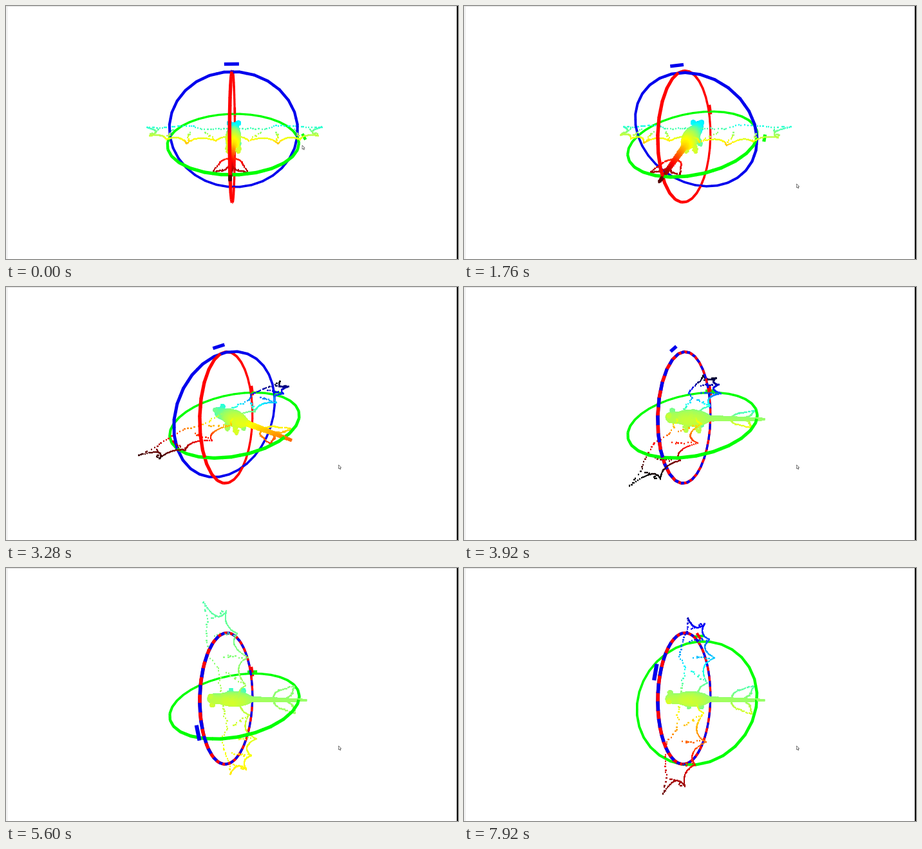
These frames come from a looping animation (702x394 px, 8000 ms). A matplotlib script:

```python
import numpy as np
import matplotlib.pyplot as plt
from matplotlib.animation import FuncAnimation
from matplotlib.collections import LineCollection
from matplotlib.patches import Polygon

W, H, STEP, FRAMES = 702, 394, 80, 100
CENTER = np.array([352.5, 203.5])
FOCAL, DISTANCE, ELEVATION = 349.5, 3.53, 26.7
RED, GREEN, BLUE = np.eye(3) * [1.0, 1.0, 0.93]
rng = np.random.default_rng(4)


def rot(axis, degrees):
    c, s = np.cos(np.radians(degrees)), np.sin(np.radians(degrees))
    i, j = [(1, 2), (2, 0), (0, 1)]["xyz".index(axis)]
    m = np.eye(3)
    m[i, i] = m[j, j] = c
    m[i, j], m[j, i] = -s, s
    return m


def key(t, *pairs):
    return np.interp(t, *zip(*pairs))


def jet(v):
    """Rainbow that fades to black beyond both ends."""
    return np.clip(1.5 - np.abs(4 * v[:, None] - [3, 2, 1]), 0, 1)


# ---- creature: x = wing span, y = up, z = towards the tail
def along(points, count):
    points = np.array(points, float)
    t = np.linspace(0, len(points) - 1, count)
    return np.column_stack([np.interp(t, np.arange(len(points)), col)
                            for col in points.T])


def tube(z, flat=True):
    radius = np.interp(z, [-.43, -.38, -.28, -.2, -.1, .05, .2, .3, .65, 1.09],
                       [.03, .075, .085, .085, .115, .125, .09, .035, .025, .008])
    angle = 2.39996 * np.arange(len(z))
    return np.column_stack([.85 * radius * np.cos(angle),
                            1.05 * radius * np.sin(angle), z])


def blob(x, y, z, rx, ry, count=35):
    d = rng.normal(size=(count, 3))
    d /= np.linalg.norm(d, axis=1)[:, None]
    return [x, y, z] + d * [rx, ry, rx]


def arc(start, mid, end, count=24):
    start, mid, end = map(np.array, (start, mid, end))
    ctrl = 2 * mid - (start + end) / 2
    t = np.linspace(0, 1, count)[:, None]
    return (1 - t) ** 2 * start + 2 * t * (1 - t) * ctrl + t ** 2 * end


def wing():
    tips = [(1.438, -.215), (1.28, .1), (.98, .22), (.65, .34), (.24, .26)]
    mids = [(1.24, -.06), (1.11, .09), (.82, .165), (.49, .18)]
    front = [(1.438, -.215), (1.2, -.2), (.985, -.258), (.715, -.287),
             (.51, -.137), (.25, -.15), (.08, -.15)]
    parts = [arc(p, m, q) for p, m, q in zip(tips, mids, tips[1:])]
    parts.append(along([(.24, .26), (.18, .17), (.08, .12)], 12))
    parts.append(along(front, 34) + rng.normal(0, .008, (34, 2)))
    for root, tip in zip(front[1:5], tips[1:]):
        t = rng.uniform(.25, .9, 9)[:, None]
        parts.append(root + t * (np.array(tip) - root)
                     + rng.normal(0, .012, (9, 2)))
    flat = np.vstack(parts)
    return np.column_stack([flat[:, 0], np.full(len(flat), .065), flat[:, 1]])


def hind_leg():
    flat = along([(.02, .64), (.07, .65), (.13, .71), (.16, .8), (.215, .94),
                  (.13, .92), (.07, .9), (.03, .84)], 44)
    flat += rng.normal(0, .004, flat.shape)
    return np.column_stack([flat[:, 0], np.zeros(44), flat[:, 1]])


def both_sides(p):
    return np.vstack([p, p * [-1, 1, 1]])


body = [tube(np.linspace(-.43, .3, 1100)), tube(np.linspace(.28, 1.09, 420))]
for z in (-.1, .11):
    body.append(both_sides(blob(.075, -.15, z, .035, .07)))
body.append(both_sides(blob(.07, .09, -.34, .03, .03)))
body = np.vstack(body)
limbs = both_sides(np.vstack([wing(), hind_leg()]))
cloud = np.vstack([body, limbs])
dot_size = np.r_[np.full(len(body), 3.0), np.full(len(limbs), 2.4)]

# ---- gimbal rings: 30-sided, each side cut in two
corner = np.radians(np.arange(31) * 12)
circle = np.column_stack([np.cos(corner), np.sin(corner)])
circle = along(circle, 61)
zero = np.zeros(61)
RINGS = {
    "red": (np.column_stack([zero, circle]), [0, 0, -1.1], [0, .1, 0], RED),
    "green": (np.column_stack([circle[:, 0], zero, circle[:, 1]]),
              [1.1, 0, 0], [0, 0, .1], GREEN),
    "blue": (np.column_stack([circle, zero]), [0, 1.1, 0], [.1, 0, 0], BLUE),
}


def ring_pieces(name):
    pts, tick, half, color = RINGS[name]
    start, end = pts[:-1], pts[1:]
    pad = .04 * (end - start)
    tick, half = np.array(tick), np.array(half)
    return (np.vstack([start - pad, tick - half]),
            np.vstack([end + pad, tick + half]), color)


PIECES = {name: ring_pieces(name) for name in RINGS}


def angles(t):
    turn = 1640
    pitch = key(t, (7100, 0), (7100 + turn, 90))
    yaw = key(t, (1800, 0), (2240, 4), (3800, 90))
    roll = key(t, (3815, 0), (3815 + turn, 90), (3815 + 2 * turn, 0))
    return pitch, yaw, roll


def camera(t):
    orbit = key(t, (0, 2.2), (80, 2.8), (240, 2.8), (1680, 22.7))
    lift = key(t, (240, 0), (1680, 2.5))
    return rot("x", lift) @ rot("y", -orbit) @ rot("x", ELEVATION)


def project(points, cam):
    p = points @ cam.T
    depth = DISTANCE - p[:, 2]
    xy = CENTER + FOCAL * p[:, :2] * [1, -1] / depth[:, None]
    return xy, depth


fig = plt.figure(figsize=((W + 1e-6) / 72, (H + 1e-6) / 72), dpi=72,
                 facecolor="white")
ax = fig.add_axes([0, 0, 1, 1])
ax.set(xlim=(0, W), ylim=(H, 0))
ax.axis("off")
ax.plot([0, W], [.5, .5], color="#dedede", lw=1)
ax.plot([.5, .5], [0, H], color="#dedede", lw=1)
ax.plot([W - 1, W - 1], [0, H], color="#111111", lw=2)
scene = LineCollection([], capstyle="butt", zorder=3)
ax.add_collection(scene, autolim=False)
ARROW = np.array([(0, 0), (0, 6), (1.4, 4.8), (2.4, 7), (3.4, 6.5),
                  (2.5, 4.5), (4.2, 4.3)])
cursor = Polygon(ARROW, closed=True, fc="white", ec="#555555", lw=.7, zorder=5)
ax.add_patch(cursor)


def draw(frame):
    t = frame * STEP
    pitch, yaw, roll = angles(t)
    cam = camera(t)
    outer = rot("x", pitch)
    middle = outer @ rot("y", yaw)
    inner = middle @ rot("z", roll)

    segments, widths, colors, depths = [], [], [], []
    for name, frame_rot in (("red", outer), ("green", middle), ("blue", inner)):
        start, end, color = PIECES[name]
        p, dp = project(start @ frame_rot.T, cam)
        q, dq = project(end @ frame_rot.T, cam)
        depth = (dp + dq) / 2
        width = 14.2 / depth
        width[-1] *= 1.12
        order = depth.copy()
        if name == "blue" and yaw > 89:
            # coincident rings show through each other in dashes
            order += np.where(np.arange(len(order)) % 2, .1, -.1)
        segments.append(np.stack([p, q], axis=1))
        widths.append(width)
        colors.append(np.tile(color, (len(p), 1)))
        depths.append(order)

    world = cloud @ inner.T
    xy, depth = project(world, cam)
    half = np.column_stack([dot_size / 2, np.zeros(len(xy))])
    segments.append(np.stack([xy - half, xy + half], axis=1))
    widths.append(dot_size)
    colors.append(jet(.52 + .48 * world[:, 2]))
    depths.append(depth)

    order = np.argsort(-np.concatenate(depths))
    scene.set_segments(np.concatenate(segments)[order])
    scene.set_linewidths(np.concatenate(widths)[order])
    scene.set_color(np.concatenate(colors)[order])

    tip = (key(t, (0, 460), (240, 461), (1120, 505), (1600, 516.5)),
           key(t, (0, 217), (240, 217), (1120, 223), (1640, 277)))
    cursor.set_xy(ARROW + tip)
    return scene, cursor


animation = FuncAnimation(fig, draw, frames=FRAMES, interval=STEP,
                          repeat=True, repeat_delay=0, blit=False)
plt.show()
```
